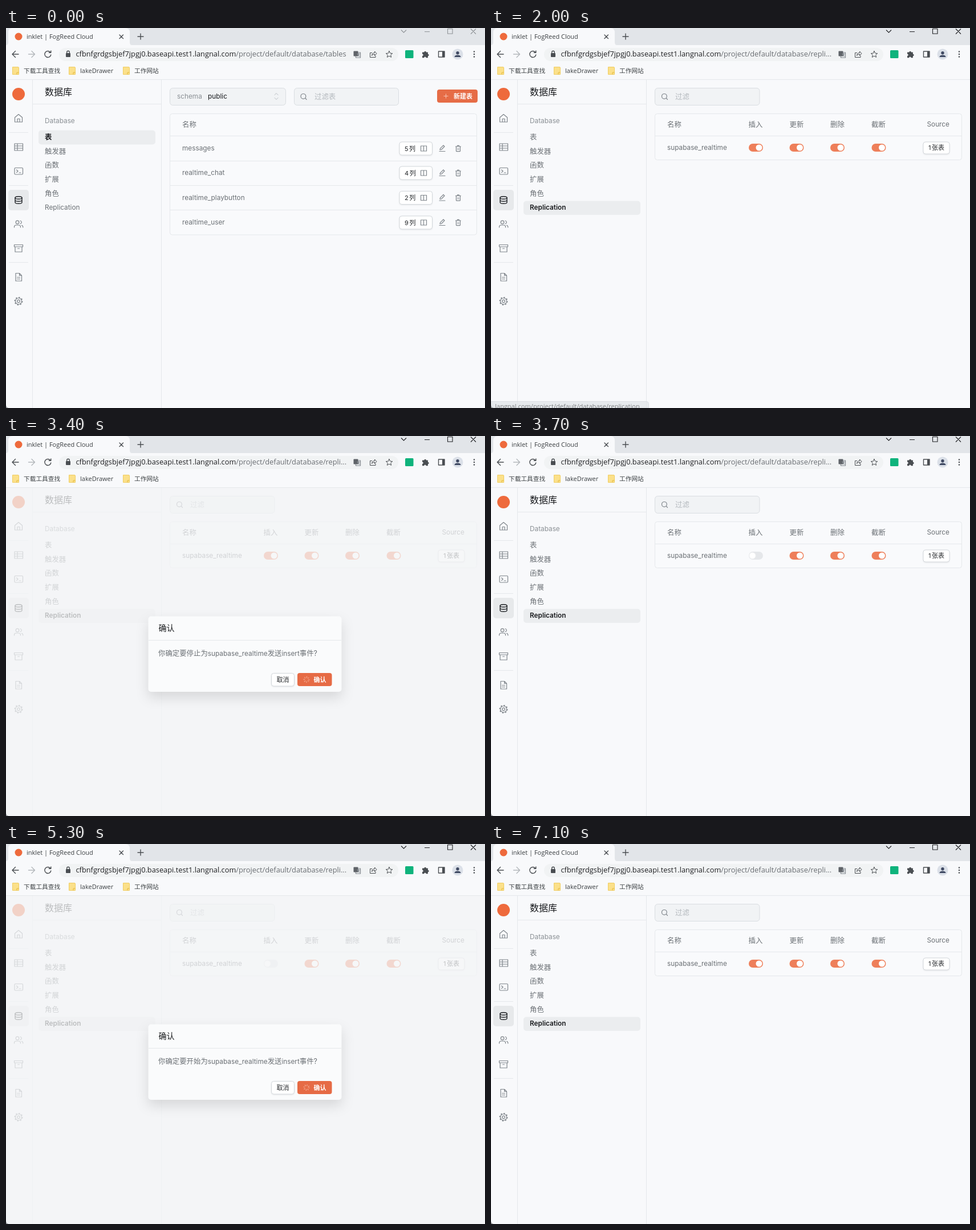
Write an HTML page that moves like this. It is 840 px wide and 667 px high and loops after 8 s.

```html
<!DOCTYPE html>
<html lang="zh">
<head>
<meta charset="utf-8">
<title>Database replication</title>
<style>
html, body { margin: 0; width: 100%; height: 100%; overflow: hidden; background: #f8f9fb; }
svg { display: block; }
text { font: 11.8px Inter, "Noto Sans CJK SC", sans-serif; fill: #6b7075; white-space: pre; }
.zh { font-size: 12.4px; }
.latin { font-size: 11.8px; }
.small { font-size: 11px; fill: #25282b; word-spacing: -1.5px; }
.dark { fill: #17191c; }
.bold { font-weight: 600; fill: #17191c; }
.hint { fill: #b4b9be; }
.ui { font: 11px "Open Sans", "Noto Sans CJK SC", sans-serif; fill: #3c4043; }
.mark { font-size: 10.7px; }
.url { font-size: 12.8px; fill: #6a6e73; }
.white { fill: #fff; font-weight: 600; }
.line { stroke: #e5e8eb; fill: none; }
.icon { fill: none; stroke: #7f858b; stroke-width: 1.2; stroke-linecap: round; stroke-linejoin: round; }
.ink { stroke: #4a4e52; stroke-width: 1.4; }
.thin { stroke-width: .8; }
.field { fill: #f1f3f5; stroke: #d9dde1; }
.card { fill: #f9fafc; stroke: #e5e8eb; }
.chip { fill: #ebedef; }
.btn { fill: #fff; stroke: #d3d7db; filter: drop-shadow(0 1px 1px rgba(0,0,0,.08)); }
.on { fill: #ee7f5a; }

/* One 8 s timeline; 1.25% is a tick of 100 ms. */
.before, .after, .controls, .hover, .status, .shade, .dialog, .idle, .busy,
.press, .stop, .start, .track, .knob, .spin {
  animation: 8s step-end -8ms infinite;
}
.before { animation-name: before; }
.after { animation-name: after; }
.controls { animation-name: controls; stroke-width: 1.1; fill: none; }
.hover { animation-name: hover; }
.status { animation-name: status; }
.shade { animation-name: shade; }
.dialog { animation-name: dialog; transform-origin: 419px 383px; }
.idle { animation-name: idle; }
.busy { animation-name: busy; }
.press { animation-name: press; }
.stop { animation-name: stop; }
.start { animation-name: start; }
.track { animation-name: track; }
.knob { animation-name: knob; }
.spin { animation-name: spin; transform-origin: 527px 427.5px; }

@keyframes before { 0% { visibility: visible } 18.75%, 100% { visibility: hidden } }
@keyframes after { 0% { visibility: hidden } 18.75%, 100% { visibility: visible } }
@keyframes controls { 0% { stroke: #8f9397 } 17.5%, 100% { stroke: #202124 } }
@keyframes hover { 0% { fill: #6b7075 } 11.25% { fill: #3c4043 } 12.5%, 100% { fill: #17191c } }
@keyframes status {
  0% { opacity: 0 } 15% { opacity: .6 } 16.25% { opacity: 1 }
  25% { opacity: .65 } 26.25% { opacity: .3 } 27.5%, 100% { opacity: 0 }
}
@keyframes shade {
  0% { opacity: 0 }
  31.25% { opacity: .15 } 32.5% { opacity: .43 } 33.75% { opacity: .73 } 35% { opacity: .92 } 36.25% { opacity: 1 }
  43.75% { opacity: .55 } 45% { opacity: .18 } 46.25% { opacity: 0 }
  57.5% { opacity: .04 } 58.75% { opacity: .17 } 60% { opacity: .45 } 61.25% { opacity: .75 } 62.5% { opacity: 1 }
  67.5% { opacity: .55 } 68.75% { opacity: .18 } 70%, 100% { opacity: 0 }
}
@keyframes dialog {
  0% { opacity: 0; transform: none }
  31.25% { opacity: .3; transform: translateY(-4px) scale(.97) }
  32.5% { opacity: .78; transform: translateY(-2px) scale(.989) }
  33.75% { opacity: .93; transform: translateY(-.7px) scale(.996) }
  35% { opacity: .99; transform: none }
  36.25% { opacity: 1; transform: none }
  43.75% { opacity: .55; transform: translateY(-1px) scale(.985) }
  45% { opacity: .12; transform: translateY(-3px) scale(.97) }
  46.25% { opacity: 0; transform: none }
  57.5% { opacity: .06; transform: translateY(-5px) scale(.96) }
  58.75% { opacity: .38; transform: translateY(-4px) scale(.975) }
  60% { opacity: .87; transform: translateY(-1.6px) scale(.993) }
  61.25% { opacity: .96; transform: translateY(-.5px) scale(.997) }
  62.5% { opacity: 1; transform: none }
  67.5% { opacity: .55; transform: translateY(-1px) scale(.985) }
  68.75% { opacity: .12; transform: translateY(-3px) scale(.97) }
  70%, 100% { opacity: 0; transform: none }
}
@keyframes idle {
  0% { visibility: visible } 41.25% { visibility: hidden } 46.25% { visibility: visible }
  66.25% { visibility: hidden } 70%, 100% { visibility: visible }
}
@keyframes busy {
  0% { visibility: hidden } 41.25% { visibility: visible } 46.25% { visibility: hidden }
  66.25% { visibility: visible } 70%, 100% { visibility: hidden }
}
@keyframes press { 0% { fill: #e8764f } 38.75% { fill: #e66b45 } 46.25%, 100% { fill: #e8764f } }
@keyframes stop { 0% { visibility: visible } 50%, 100% { visibility: hidden } }
@keyframes start { 0% { visibility: hidden } 50%, 100% { visibility: visible } }
@keyframes track {
  0% { fill: #ee7f5a } 45% { fill: #eab5a4 } 46.25% { fill: #e5e7ea } 71.25% { fill: #eab5a4 } 72.5%, 100% { fill: #ee7f5a }
}
@keyframes knob {
  0% { transform: none } 45% { transform: translateX(-6px) } 46.25% { transform: translateX(-11.5px) }
  71.25% { transform: translateX(-6px) } 72.5%, 100% { transform: none }
}
@keyframes spin {
  0% { transform: none } 42.5% { transform: rotate(36deg) } 43.75% { transform: rotate(72deg) }
  66.25% { transform: none } 67.5% { transform: rotate(36deg) } 68.75%, 100% { transform: rotate(72deg) }
}
</style>
</head>
<body>
<svg width="840" height="667" viewBox="0 0 840 667">
  <defs>
    <g id="search" class="icon"><circle r="4.4" cx="-.6" cy="-.6"/><path d="M2.7 2.7 5 5"/></g>
    <g id="folder"><path d="M-5.5-6.5h9.5q1.5 0 1.5 1.5V6.5h-11z" fill="#fbe08a" stroke="#f0cd62"/><path d="M2 6.5V3h3.5" fill="none" stroke="#e4b93f"/></g>
    <g id="tools">
      <rect class="btn" x="690" y="-11.5" width="57.5" height="23" rx="4"/>
      <g class="icon">
        <path d="M727.5-4.5h10v9h-10zM732.5-4.5v9"/>
        <path d="M760 5h10M761 2.5l.5-2.5 5.5-5.5 2 2-5.5 5.5z"/>
        <path d="M788.5-3.5h9M791.5-3.5v-1.7h3v1.7M789.5-3.5v7.7q0 1 1 1h5q1 0 1-1v-7.7"/>
        <path class="thin" d="M792-.5v3M794-.5v3"/>
      </g>
    </g>
    <g id="toggle"><rect x="452" y="203" width="25" height="14" rx="7" class="on"/><circle cx="470" cy="210" r="5.5" fill="#fff"/></g>
  </defs>

  <!-- Browser window -->
  <rect width="840" height="667" fill="#f8f9fb"/>
  <path d="M0 0H840V30H0z" fill="#e2e5e9"/>
  <path d="M0 30q4 0 4-5V8q0-8 8-8H209q8 0 8 8V25q0 5 4 5z" fill="#f8f9fb"/>
  <circle cx="22" cy="15" r="6.5" fill="#ee6a3c"/>
  <text class="ui" x="36" y="19">inklet | FogReed Cloud</text>
  <g class="icon ink">
    <path d="M199 12l6.500 6.500M205.500 12 199 18.500M231 15h10M236 10v10"/>
    <path d="M22 46H11.500M16.500 40.500 11 46l5.500 5.500"/>
    <path d="M39.500 46H50M45 40.500 50.500 46 45 51.500" stroke="#b4b8bc"/>
    <path d="M77.500 42.300A5.500 5.500 0 1 0 78.800 47M78.800 40v3.300h-3.500"/>
  </g>
  <g class="controls">
    <path d="M693 3.500l4.500 4.500 4.500-4.500M734 6.500h9M774.500 1.500h8.500v8.500h-8.500zM815 1.500l9 9M824 1.500l-9 9"/>
  </g>
  <rect x="93" y="35" width="595" height="23" rx="11.5" fill="#f1f3f4"/>
  <rect x="105" y="44" width="8" height="7" rx="1" fill="#4a4e52"/>
  <path class="icon ink" d="M106.700 44v-1.500a2.300 2.300 0 0 1 4.600 0V44"/>
  <text class="ui url" x="122.500" y="50.300"><tspan fill="#202124">cfbnfgrdgsbjef7jpgj0.baseapi.test1.langnal.com</tspan>/project/default/database/<tspan class="before">tables</tspan></text>
  <text class="ui url after" x="560.500" y="50.300">repli...</text>
  <rect x="609.500" y="40.500" width="8" height="9" rx="1" fill="#5f6368"/>
  <path class="icon" d="M613.500 49.500v2.500h8v-9h-4M615.500 45.500h4.500M618 44.500v1M616.500 49.500l3-4M616.500 46.500l3 3"/>
  <g class="icon ink">
    <path d="M641.500 43.500h-3v8h9.500v-2.500M641.500 48q.5-4.500 5-4.500V41l3.500 3.800-3.500 3.700V46q-3.500 0-5 2z" stroke-width="1"/>
    <path d="M672 40.500l1.700 3.700 4 .4-3 2.700.9 4-3.600-2.100-3.600 2.100.9-4-3-2.700 4-.4z" stroke-width="1"/>
    <path d="M758.500 41h10.500v10h-10.500z"/>
  </g>
  <rect x="700" y="39" width="14.500" height="14" rx="1.5" fill="#0fb37c"/>
  <path d="M730 42.500h3.300a1.800 1.800 0 0 1 3.600 0h3v3.200a1.800 1.800 0 0 1 0 3.600v3h-3.300a1.700 1.700 0 0 0-3.400 0H730v-3.300a1.700 1.700 0 0 0 0-3.400z" fill="#4a4e52"/>
  <path d="M765 41h4v10h-4z" fill="#4a4e52"/>
  <circle cx="792" cy="46" r="9.5" fill="#dbe0e8"/>
  <path d="M786.500 51q0-3.500 5.500-3.500t5.500 3.500z" fill="#404a63"/>
  <circle cx="792" cy="43.700" r="2.700" fill="#404a63"/>
  <path d="M821 41.500v.01M821 46v.01M821 50.500v.01" stroke="#4a4e52" stroke-width="2.6" stroke-linecap="round"/>
  <use href="#folder" x="17" y="75"/>
  <use href="#folder" x="116" y="75"/>
  <use href="#folder" x="211" y="75"/>
  <text class="ui mark" x="31" y="79">下载工具查找</text>
  <text class="ui" x="130" y="79">lakeDrawer</text>
  <text class="ui mark" x="225" y="79">工作网站</text>
  <path class="line" d="M0 90.500H840"/>

  <!-- Icon rail -->
  <path class="line" d="M46.500 91V667M272.500 91V667M47 133.500H272M5 183.500H39M5 276.500H39M5 411.500H39"/>
  <circle cx="22" cy="116" r="11" fill="#ee6a3c"/>
  <rect x="4" y="284" width="36" height="36" rx="5" fill="#e7e9eb"/>
  <g class="icon">
    <path d="M15.500 157 22 151.500l6.500 5.500v8h-13zM20 165v-5.500h4v5.500"/>
    <path d="M15 203h14.500v12H15zM15 207h14.500M15 211h14.500M20 203v12"/>
    <path d="M16.500 245.500h11.500q1.500 0 1.500 1.500v8.500q0 1.500-1.500 1.500H16.500q-1.500 0-1.500-1.500V247q0-1.500 1.500-1.500zM18.500 249l2.500 2.300-2.500 2.300M23 254h3"/>
    <g stroke="#202327" stroke-width="1.4">
      <ellipse cx="22" cy="298" rx="6" ry="2.3"/>
      <path d="M16 298v8c0 3 12 3 12 0v-8M16 302c0 3 12 3 12 0"/>
    </g>
    <circle cx="20" cy="341" r="2.8"/>
    <path d="M14.500 350v-1q0-3 3-3h5q3 0 3 3v1M25 338.300q2.300.7 2.300 2.700t-2.300 2.700M27.500 346.300q2.300.7 2.300 3.700"/>
    <path d="M14.500 380.500h15v3.500h-15zM16 384v9h12v-9M20.500 387h3"/>
    <path d="M17 430.500h6.500l4 4V444H17zM23.500 430.500v4h4M19.500 437.500h5M19.500 440.500h5"/>
    <circle cx="22" cy="479.500" r="2.3"/>
    <circle cx="22" cy="479.500" r="5.5"/>
    <circle cx="22" cy="479.500" r="6.6" stroke-width="1.8" stroke-dasharray="2.3 2.88" stroke-linecap="butt"/>
  </g>

  <!-- Menu -->
  <text class="dark" x="68" y="118" style="font-size:16px">数据库</text>
  <text x="68" y="167" style="fill:#8b9095">Database</text>
  <g class="before">
    <rect class="chip" x="57" y="179.500" width="205" height="25" rx="5"/>
    <text class="zh bold" x="68" y="195.500">表</text>
    <text class="hover" x="68" y="319">Replication</text>
  </g>
  <g class="after">
    <rect class="chip" x="57" y="303.500" width="205" height="24.500" rx="5"/>
    <text class="zh" x="68" y="195.500">表</text>
    <text class="bold" x="68" y="319">Replication</text>
  </g>
  <text class="zh" x="68" y="220.500">触发器</text>
  <text class="zh" x="68" y="245">函数</text>
  <text class="zh" x="68" y="270">扩展</text>
  <text class="zh" x="68" y="295">角色</text>

  <!-- Tables page -->
  <g class="before">
    <rect class="field" x="287.500" y="105.500" width="203" height="30" rx="5"/>
    <text x="300" y="124" style="fill:#8b9095">schema</text>
    <text class="dark" x="354" y="124">public</text>
    <path class="icon" style="stroke:#b9bec3;stroke-width:1" d="M471 117.500l3-3 3 3M471 122.500l3 3 3-3"/>
    <rect class="field" x="505.500" y="105.500" width="183" height="30" rx="5"/>
    <use href="#search" x="522" y="120.500"/>
    <text class="zh hint" x="541" y="124.500">过滤表</text>
    <rect x="756" y="108" width="71" height="23" rx="4" fill="#e66c46"/>
    <path d="M767.500 119.500h8M771.500 115.500v8" stroke="#f7c3b2"/>
    <text class="small white" x="785" y="123.500">新建表</text>
    <rect class="card" x="287.500" y="150.500" width="538" height="212.500" rx="4"/>
    <path class="line" d="M288 189.500H825M288 233.500H825M288 276.500H825M288 319.500H825"/>
    <text class="zh" x="309" y="173.500">名称</text>
    <g transform="translate(0 211.5)"><use href="#tools"/><text x="309" y="3.5">messages</text><text class="small" x="699" y="4">5 列</text></g>
    <g transform="translate(0 254.5)"><use href="#tools"/><text x="309" y="3.5">realtime_chat</text><text class="small" x="699" y="4">4 列</text></g>
    <g transform="translate(0 298)"><use href="#tools"/><text x="309" y="3.5">realtime_playbutton</text><text class="small" x="699" y="4">2 列</text></g>
    <g transform="translate(0 341.5)"><use href="#tools"/><text x="309" y="3.5">realtime_user</text><text class="small" x="699" y="4">9 列</text></g>
  </g>

  <!-- Replication page -->
  <g class="after">
    <rect class="field" x="287.500" y="105.500" width="183.500" height="30" rx="5"/>
    <use href="#search" x="304.500" y="120.500"/>
    <text class="zh hint" x="323" y="124.500">过滤</text>
    <rect class="card" x="287.500" y="150.500" width="538" height="81" rx="4"/>
    <path class="line" d="M288 189.500H825"/>
    <text class="zh" y="173.500"><tspan x="309">名称</tspan><tspan x="451.500">插入</tspan><tspan x="523.500">更新</tspan><tspan x="595">删除</tspan><tspan x="667">截断</tspan></text>
    <text x="764.500" y="173.300">Source</text>
    <text x="309" y="214">supabase_realtime</text>
    <rect class="track" x="452" y="203" width="25" height="14" rx="7"/>
    <circle class="knob" cx="470" cy="210" r="5.5" fill="#fff"/>
    <use href="#toggle" x="71.500"/>
    <use href="#toggle" x="143"/>
    <use href="#toggle" x="215.500"/>
    <rect class="btn" x="758" y="200" width="46" height="21" rx="4"/>
    <text class="small" x="767" y="214">1 张表</text>
  </g>

  <g class="status">
    <path d="M0 655.500H272.500q4 0 4 4V667H0z" fill="#dfe2e6" stroke="#cdd1d6"/>
    <text class="ui" x="1" y="668" style="font-size:11.1px">..langnal.com/project/default/database/replication</text>
  </g>

  <!-- Confirmation -->
  <rect class="shade" y="91" width="840" height="576" fill="rgba(243,244,246,.75)"/>
  <g class="dialog">
    <rect x="249.500" y="316.500" width="339" height="132.500" rx="5" fill="#fafbfc" style="filter:drop-shadow(0 10px 11px rgba(0,0,0,.12))"/>
    <path class="line" d="M250 358.500H588"/>
    <text class="dark" x="267.500" y="342" style="font-size:14px">确认</text>
    <text class="zh" x="267" y="385.500">你确定要<tspan class="stop">停止</tspan></text>
    <text class="zh start" x="316.600" y="385.500">开始</text>
    <text class="zh" x="341.400" y="385.500">为<tspan class="latin">supabase_realtime</tspan>发送<tspan class="latin">insert</tspan>事件?</text>
    <g class="idle">
      <rect class="btn" x="485" y="416.500" width="40" height="22.500" rx="4"/>
      <text class="small" x="494" y="431.500">取消</text>
      <rect class="press" x="530" y="416" width="41" height="23" rx="4"/>
      <text class="small white" x="539.500" y="431.500">确认</text>
    </g>
    <g class="busy">
      <rect class="btn" x="465.500" y="416.500" width="40" height="22.500" rx="4"/>
      <text class="small" x="474.500" y="431.500">取消</text>
      <rect x="511" y="416" width="60.500" height="23" rx="4" fill="#e66b45"/>
      <circle class="spin" cx="527" cy="427.500" r="4" fill="none" stroke="#f5b9a5" stroke-width="2.8" stroke-dasharray="1 2.142"/>
      <text class="small white" x="539.500" y="431.500">确认</text>
    </g>
  </g>
  <path d="M0 661q0 6 6 6H0z" fill="#8f9296"/>
</svg>
</body>
</html>
```
